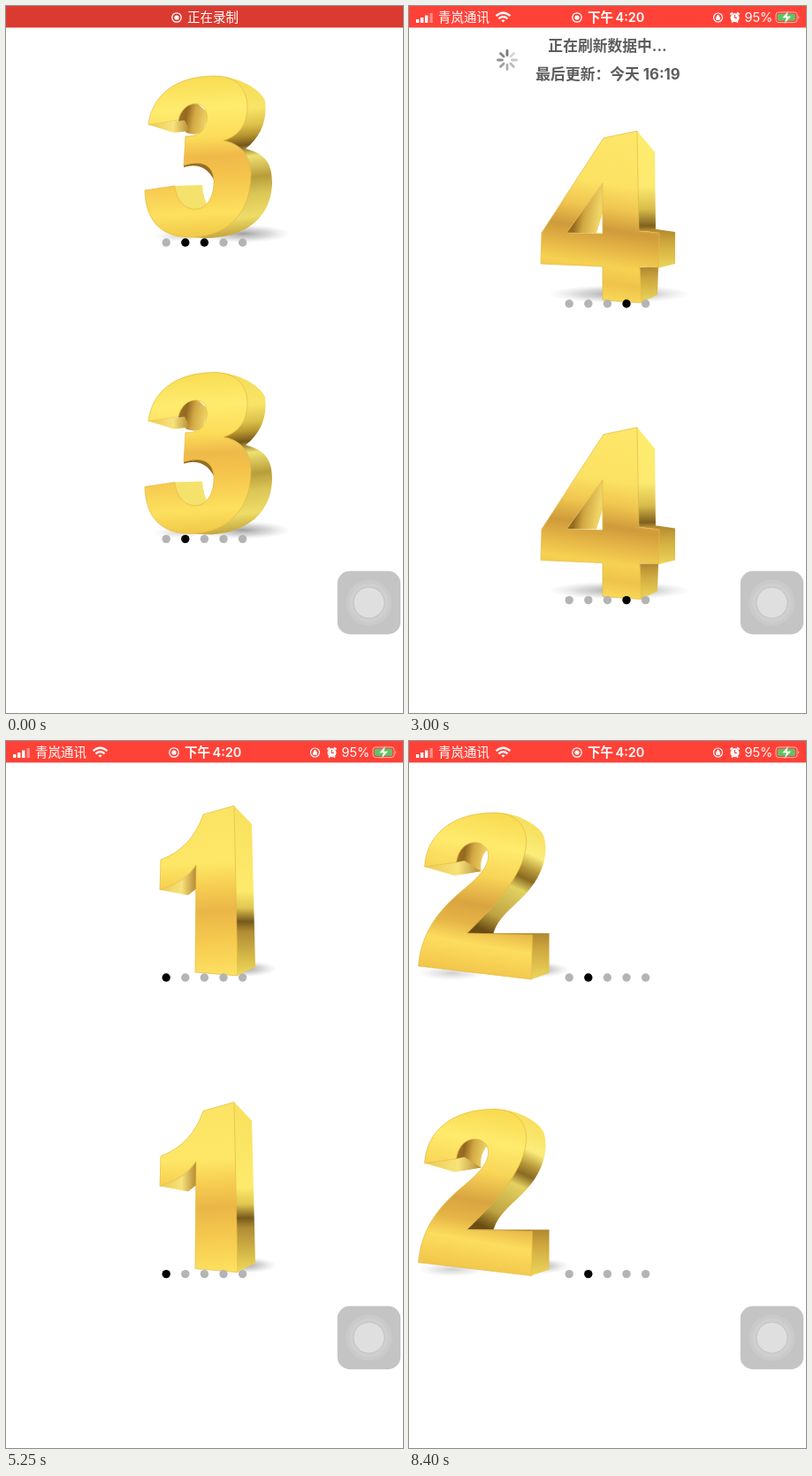
These frames come from a looping animation (449x798 px, 8550 ms). An HTML page:

```html
<!DOCTYPE html>
<html lang="zh">
<head>
<meta charset="utf-8">
<style>
html, body { margin: 0; width: 100%; height: 100%; overflow: hidden; background: #fff; }
svg { display: block; width: 449px; height: 798px; font-family: Inter, "Noto Sans CJK SC", "Noto Sans CJK", sans-serif; }
.face { stroke: #e3b93f; stroke-width: .7; stroke-linejoin: round; }
#bar text { font-size: 14.5px; fill: #fff; }
#header text { font-size: 16.8px; font-weight: bold; fill: #5c5c5c; text-anchor: middle; }
</style>
</head>
<body>
<svg viewBox="0 0 449 798">
<defs>
  <radialGradient id="shade">
    <stop offset="0" stop-color="#777" stop-opacity=".7"/>
    <stop offset=".6" stop-color="#aaa" stop-opacity=".42"/>
    <stop offset="1" stop-color="#ddd" stop-opacity=".1"/>
  </radialGradient>
  <linearGradient id="front3" gradientUnits="userSpaceOnUse" x1="212" y1="79" x2="222" y2="262">
    <stop offset="0" stop-color="#f8dc52"/><stop offset=".2" stop-color="#ffec6e"/>
    <stop offset=".38" stop-color="#fcdc59"/><stop offset=".5" stop-color="#efb94a"/>
    <stop offset=".62" stop-color="#f4c34b"/><stop offset=".85" stop-color="#fde05e"/>
    <stop offset="1" stop-color="#f0c646"/>
  </linearGradient>
  <linearGradient id="side3" gradientUnits="userSpaceOnUse" x1="272" y1="79" x2="292" y2="262">
    <stop offset="0" stop-color="#f5dc58"/><stop offset=".2" stop-color="#f9e468"/>
    <stop offset=".3" stop-color="#dcc24c"/><stop offset=".36" stop-color="#b8962f"/>
    <stop offset=".42" stop-color="#76561a"/><stop offset=".49" stop-color="#efe070"/>
    <stop offset=".62" stop-color="#b89d3a"/><stop offset=".72" stop-color="#dac556"/>
    <stop offset=".86" stop-color="#efdc66"/><stop offset="1" stop-color="#b59432"/>
  </linearGradient>
  <linearGradient id="inner" x1="0" y1="0" x2="1" y2=".2">
    <stop offset="0" stop-color="#a5772a"/><stop offset=".35" stop-color="#94691f"/>
    <stop offset=".6" stop-color="#d2a743"/><stop offset="1" stop-color="#f0d566"/>
  </linearGradient>
  <linearGradient id="under" x1="0" y1="0" x2="1" y2="0">
    <stop offset="0" stop-color="#eccb50"/><stop offset=".6" stop-color="#f7e27a"/>
    <stop offset="1" stop-color="#b58a34"/>
  </linearGradient>
  <linearGradient id="front4" gradientUnits="userSpaceOnUse" x1="235" y1="74" x2="207" y2="265">
    <stop offset="0" stop-color="#fde668"/><stop offset=".3" stop-color="#fce263"/>
    <stop offset=".44" stop-color="#f0c650"/><stop offset=".57" stop-color="#cf9a3b"/>
    <stop offset=".66" stop-color="#e2b144"/><stop offset=".78" stop-color="#f6d151"/>
    <stop offset=".88" stop-color="#efc34a"/><stop offset="1" stop-color="#fbde5c"/>
  </linearGradient>
  <linearGradient id="side4" x1="0" y1="0" x2="0" y2="1">
    <stop offset="0" stop-color="#fdec6c"/><stop offset=".55" stop-color="#fdea70"/>
    <stop offset=".78" stop-color="#d9bc4c"/><stop offset=".95" stop-color="#80601e"/>
    <stop offset="1" stop-color="#b99030"/>
  </linearGradient>
  <linearGradient id="block" x1="0" y1="0" x2="0" y2="1">
    <stop offset="0" stop-color="#b18830"/><stop offset=".35" stop-color="#cfa93f"/>
    <stop offset="1" stop-color="#edd65a"/>
  </linearGradient>
  <linearGradient id="front1" gradientUnits="userSpaceOnUse" x1="220" y1="75" x2="230" y2="264">
    <stop offset="0" stop-color="#fbe463"/><stop offset=".33" stop-color="#fee766"/>
    <stop offset=".48" stop-color="#f6cd50"/><stop offset=".62" stop-color="#ebb648"/>
    <stop offset=".78" stop-color="#f4c74d"/><stop offset="1" stop-color="#fde060"/>
  </linearGradient>
  <linearGradient id="side1" x1="0" y1="0" x2="0" y2="1">
    <stop offset="0" stop-color="#f8e05c"/><stop offset=".5" stop-color="#fdea6c"/>
    <stop offset=".6" stop-color="#e2c650"/><stop offset=".68" stop-color="#765a1c"/>
    <stop offset=".74" stop-color="#b08c34"/><stop offset="1" stop-color="#f1da58"/>
  </linearGradient>
  <linearGradient id="front2" gradientUnits="userSpaceOnUse" x1="238" y1="81" x2="206" y2="266">
    <stop offset="0" stop-color="#f8da50"/><stop offset=".2" stop-color="#ffeb6d"/>
    <stop offset=".38" stop-color="#f8d557"/><stop offset=".56" stop-color="#d9a440"/>
    <stop offset=".68" stop-color="#e5b446"/><stop offset=".8" stop-color="#fddd5d"/>
    <stop offset="1" stop-color="#f0c349"/>
  </linearGradient>
  <linearGradient id="side2" gradientUnits="userSpaceOnUse" x1="290" y1="90" x2="232" y2="216">
    <stop offset="0" stop-color="#f7dc56"/><stop offset=".28" stop-color="#fbec7b"/>
    <stop offset=".4" stop-color="#b49535"/><stop offset=".48" stop-color="#8a6a22"/>
    <stop offset=".58" stop-color="#e3d160"/><stop offset=".85" stop-color="#bfa442"/>
    <stop offset="1" stop-color="#6b4d14"/>
  </linearGradient>

  <g id="d1">
    <ellipse cx="270" cy="257" rx="35" ry="9" fill="url(#shade)"/>
    <path d="M215 140Q202 160 174 168L206 174L215 167Z" fill="url(#under)"/>
    <path d="M258 73L278 94L282 255L261 265Z" fill="url(#side1)"/>
    <path class="face" d="M223 83L258 73L262 265L214 261L215 140Q202 160 174 168L175 134Q210 121 223 83Z" fill="url(#front1)"/>
  </g>
  <g id="d2">
    <ellipse cx="284" cy="258" rx="38" ry="9" fill="url(#shade)"/>
    <ellipse cx="190" cy="262" rx="38" ry="8" fill="url(#shade)" opacity=".5"/>
    <path d="M194 137L204 150L223 147Q221 130 231 122L212 108L195 118Z" fill="url(#inner)"/>
    <path d="M159 142L193 152L223 147L204 135L195 137Z" fill="url(#under)"/>
    <path d="M236 81C260 79 290 95 294 108C300 128 292 152 274 172C258 189 243 198 237 217H205L255 140Z" fill="url(#side2)"/>
    <path d="M207 217L300 217V262L280 269V221Z" fill="url(#block)"/>
    <path class="face" d="M159 142C161 106 190 81 237 81C264 81 275 97 274 116C272 146 249 176 207 217L281 219L280 269L152 254C155 217 174 191 205 166C224 150 232 140 231 127C229 110 199 108 195 137Z" fill="url(#front2)"/>
  </g>
  <g id="d3">
    <ellipse cx="268" cy="257" rx="52" ry="10" fill="url(#shade)"/>
    <ellipse cx="195" cy="260" rx="28" ry="6" fill="url(#shade)" opacity=".4"/>
    <path d="M194 128L204 143Q214 147 222 142L230 122L212 106L196 114Z" fill="url(#inner)"/>
    <path d="M161 134L190 143L208 141L202 129Z" fill="url(#under)"/>
    <path d="M191 203L222 202Q223 218 229 226L214 233L194 223Z" fill="#f5e26c"/>
    <path d="M236 79C264 79 289 95 293 107C296 128 288 148 271 161C294 167 301 178 301 200C300 238 272 262 225 262L208 261L234 218L238 150Z" fill="url(#side3)"/>
    <path d="M201 182Q224 175 235 196L238 185L222 173L201 178Z" fill="#946c22"/>
    <path class="face" d="M161 134C165 102 190 79 236 79C262 79 274 96 273 116C272 136 262 147 246 152C266 155 277 170 277 190C277 232 252 261 208 261C176 261 158 243 157 208L191 203C193 222 205 231 217 229C230 227 236 210 235 196C234 180 222 173 201 180L203 147C220 148 229 137 227 122C225 105 200 106 195 129Z" fill="url(#front3)"/>
  </g>
  <g id="d4">
    <ellipse cx="238" cy="256" rx="78" ry="10" fill="url(#shade)"/>
    <path d="M219 131V165L212 187H178Z" fill="url(#inner)"/>
    <path d="M258 72L278 96L279 185H259Z" fill="url(#side4)"/>
    <path d="M259 184L280 183L301 186V222L281 227V187Z" fill="url(#block)"/>
    <path d="M261 226H282L281 257L262 266Z" fill="url(#block)"/>
    <path class="face" fill-rule="evenodd" d="M220 80L258 72L260 185L283 187L282 226L261 225L263 266L219 263V225L149 222L150 187ZM219 131L178 187L219 188Z" fill="url(#front4)"/>
  </g>
</defs>

<rect width="449" height="798" fill="#fff"/>
<g id="page">
  <g id="header">
    <g id="spinner"></g>
    <text x="224.5" y="-18">正在刷新数据中...</text>
    <text x="225" y="14">最后更新：今天 16:19</text>
  </g>
  <g id="view">
    <g id="strip">
      <use href="#d1"/><use href="#d2" x="449"/><use href="#d3" x="898"/><use href="#d4" x="1347"/>
    </g>
  </g>
  <use href="#view" y="334.6"/>
  <g id="dots"></g>
</g>

<g id="bar">
  <rect id="red" width="449" height="24.4"/>
  <g id="recording">
    <circle cx="193" cy="13" r="5.2" fill="none" stroke="#fff" stroke-width="1.3"/>
    <circle cx="193" cy="13" r="2.6" fill="#fff"/>
    <text x="205" y="18">正在录制</text>
  </g>
  <g id="status">
    <path d="M8 15h3.4v4H8zM13 13h3.4v6H13zM18 10.5h3.4V19H18z" fill="#fff"/>
    <path d="M23.500 8h3.4v11h-3.4z" fill="#fff" opacity=".4"/>
    <text x="33" y="18">青岚通讯</text>
    <path d="M98.500 11.200Q106.500 4.200 114.500 11.200M101.500 14.300Q106.500 10 111.500 14.300" fill="none" stroke="#fff" stroke-width="2.3"/>
    <path d="M106.500 18.500l-2.200-2.300q2.200-1.600 4.400 0z" fill="#fff"/>
    <circle cx="190" cy="13" r="5.2" fill="none" stroke="#fff" stroke-width="1.3"/>
    <circle cx="190" cy="13" r="2.6" fill="#fff"/>
    <text x="202" y="18" font-weight="600">下午<tspan dx="2.5">4:20</tspan></text>
    <circle cx="349.5" cy="13" r="5" fill="none" stroke="#fff" stroke-width="1.2"/>
    <path d="M347 12.500h5v3.300h-5zM348 12.500v-1.500q1.500-2 3 0v1.500" fill="#fff"/>
    <circle cx="368.5" cy="13.3" r="5" fill="#fff"/>
    <path d="M363.300 9.500l2.800-2M373.700 9.500l-2.800-2M365 18.500l1-1M372 18.500l-1-1" stroke="#fff" stroke-width="2"/>
    <path d="M368.500 10v3.500h2.500" fill="none" stroke="#ff4238" stroke-width="1.1"/>
    <text x="379.5" y="18">95%</text>
    <rect x="415" y="7" width="24" height="11.6" rx="3" fill="none" stroke="#fff" stroke-opacity=".6"/>
    <rect x="416.8" y="8.8" width="20" height="8" rx="1.5" fill="#5fc466"/>
    <path d="M440.300 11q2 1.800 0 3.600z" fill="#fff" opacity=".7"/>
    <path d="M429 5.500l-7 8h4.500l-2 6.500 8-8.500h-4.800z" fill="#fff" stroke="#5fc466" stroke-width=".5"/>
  </g>
</g>

<g transform="translate(410.5 673.5)">
  <rect x="-35.7" y="-35.7" width="71.4" height="71.4" rx="14" fill="#c4c4c4"/>
  <circle r="26" fill="#cacaca"/>
  <circle r="22" fill="#cfcfcf"/>
  <circle r="17.5" fill="#dfdfdf" stroke="#bdbdbd" stroke-width=".8"/>
</g>
</svg>
<script>
const LOOP = 8550, PAGE = 449, SLIDE = 238, RELOAD = 4050;
const $ = id => document.getElementById(id);
const add = (parent, tag, attrs) => {
  const el = document.createElementNS("http://www.w3.org/2000/svg", tag);
  for (const k in attrs) el.setAttribute(k, attrs[k]);
  return parent.appendChild(el);
};

const rows = [267, 601.6].map(cy =>
  Array.from({ length: 5 }, (_, i) => add($("dots"), "circle", { cx: 181.2 + i * 21.6, cy, r: 4.7 })));
const spokes = Array.from({ length: 8 }, (_, i) => add($("spinner"), "path", {
  d: "M0-5.5V-10.5", stroke: "#777", "stroke-width": 2.8, "stroke-linecap": "round",
  transform: `translate(111 -8) rotate(${i * 45})`
}));

const ease = x => x * x * (3 - 2 * x);

// Interpolates rows of [time, ...values].
function sample(table, t, curve = x => x) {
  const i = table.findIndex(row => row[0] > t);
  if (i < 0) return table[table.length - 1].slice(1);
  const a = table[i - 1], b = table[i], k = curve((t - a[0]) / (b[0] - a[0]));
  return a.slice(1).map((v, j) => v + (b[j + 1] - v) * k);
}

const RED = [[0, 219, 58, 48], [1200, 229, 61, 50], [1650, 255, 66, 56]];
const PULL = [[0, 0], [2600, 0], [3000, 69], [3150, 64.6], [3880, 64.6], [4150, 0]];
const LANDINGS = [[0, 3], [2250, 4], [6300, 2], [LOOP, 3]];

function position(t) {
  for (const [end, to] of LANDINGS)
    if (t >= end - SLIDE && t < end) return to - 1 + ease((t - end + SLIDE) / SLIDE);
  if (t < 2250) return 3;
  if (t < RELOAD) return 4;
  return t < 6300 ? 1 : 2;
}

// The upper control blends old and new dots just after landing; the lower one lags.
function paintDots(t) {
  const page = Math.floor(position(t));
  const fresh = LANDINGS.some(([end]) => t >= end && t < end + 150);
  rows.forEach((row, r) => row.forEach((dot, i) => {
    const on = fresh ? i === page - 2 || (r === 0 && i === page - 1) : i === page - 1;
    dot.setAttribute("fill", on ? "#000" : "#b4b4b4");
  }));
}

function draw(t) {
  const pull = sample(PULL, t, ease)[0];
  $("red").setAttribute("fill", `rgb(${sample(RED, t).map(Math.round)})`);
  $("recording").style.display = t < 1650 ? "" : "none";
  $("status").style.display = t < 1650 ? "none" : "";
  $("page").setAttribute("transform", `translate(0 ${pull})`);
  $("header").style.display = pull > 0 ? "" : "none";
  $("strip").setAttribute("transform", `translate(${-(position(t) - 1) * PAGE} 0)`);
  const step = Math.floor(t / 125);
  spokes.forEach((s, i) => s.setAttribute("opacity", 1 - ((step - i) % 8 + 8) % 8 * .1));
  paintDots(t);
}

const start = performance.now();
function tick() {
  draw((performance.now() - start) % LOOP);
  requestAnimationFrame(tick);
}
tick();
</script>
</body>
</html>
```
